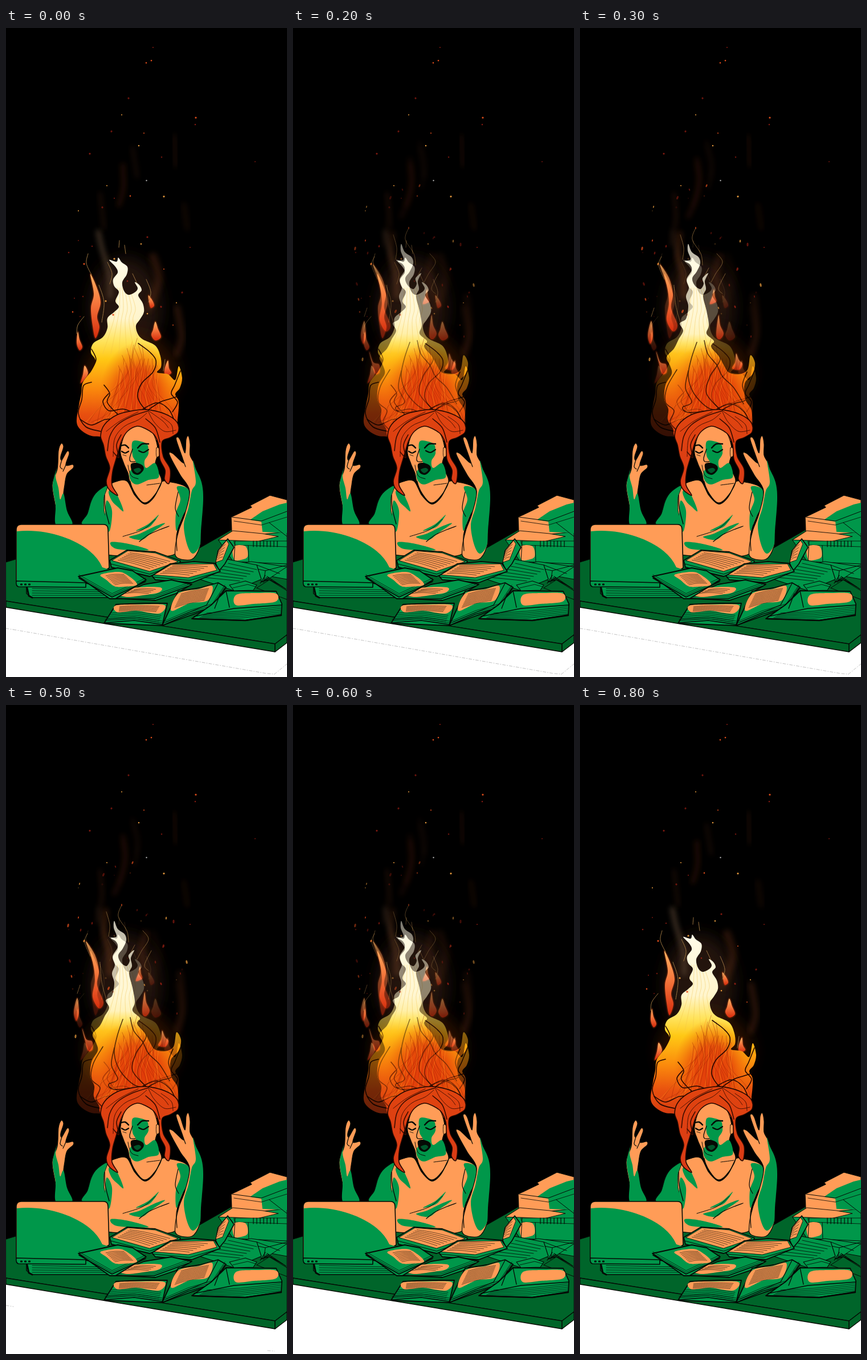
An HTML page for the animation above (0.9 s loop, 493 by 1136 pixels).

```html
<!DOCTYPE html>
<html lang="en">
<head>
<meta charset="utf-8">
<title>Burning the books</title>
<style>
html, body { margin: 0; width: 100%; height: 100%; overflow: hidden; background: #000; }
svg { display: block; width: 493px; height: 1136px; }
path { stroke-linejoin: round; stroke-linecap: round; }
</style>
</head>
<body>
<svg id="stage" viewBox="0 0 493 1136" xmlns="http://www.w3.org/2000/svg">
  <defs>
    <linearGradient id="fireA" gradientUnits="userSpaceOnUse" x1="0" y1="400" x2="0" y2="720">
      <stop offset="0" stop-color="#fffbe8"/><stop offset=".34" stop-color="#fff5cc"/>
      <stop offset=".46" stop-color="#ffe45e"/><stop offset=".56" stop-color="#ffc814"/>
      <stop offset=".72" stop-color="#fb8a0c"/><stop offset=".86" stop-color="#e8500f"/>
      <stop offset="1" stop-color="#d43a10"/>
    </linearGradient>
    <linearGradient id="fireB" gradientUnits="userSpaceOnUse" x1="0" y1="378" x2="0" y2="720">
      <stop offset="0" stop-color="#fffbe8"/><stop offset=".46" stop-color="#fff6d0"/>
      <stop offset=".51" stop-color="#ffe36a"/><stop offset=".56" stop-color="#ffc01a"/>
      <stop offset=".68" stop-color="#fa8c0e"/><stop offset=".8" stop-color="#e8540f"/>
      <stop offset="1" stop-color="#d43a10"/>
    </linearGradient>
    <radialGradient id="core">
      <stop offset="0" stop-color="#e03a0a"/><stop offset=".5" stop-color="#e4420a" stop-opacity=".85"/>
      <stop offset="1" stop-color="#f07008" stop-opacity="0"/>
    </radialGradient>
    <linearGradient id="lick" x1="0" y1="0" x2="0" y2="1">
      <stop offset="0" stop-color="#ffb060"/><stop offset=".45" stop-color="#f4763c"/>
      <stop offset="1" stop-color="#d62c0c"/>
    </linearGradient>
    <linearGradient id="hair" x1="0" y1="0" x2="0" y2="1">
      <stop offset="0" stop-color="#e0440f"/><stop offset="1" stop-color="#d93a16"/>
    </linearGradient>
    <filter id="soft" x="-1" y="-.5" width="3" height="2"><feGaussianBlur stdDeviation="5"/></filter>
    <filter id="haze" x="-1" y="-.5" width="3" height="2"><feGaussianBlur stdDeviation="14"/></filter>
  </defs>
</svg>
<script>
const GREEN = '#00974a', ORANGE = '#ff9c57', DARK = '#00652a', INK = '#050a05';
const stage = document.getElementById('stage');

function add(parent, name, attrs) {
  const el = document.createElementNS('http://www.w3.org/2000/svg', name);
  for (const key in attrs) el.setAttribute(key, attrs[key]);
  parent.appendChild(el);
  return el;
}
const group = (parent, attrs = {}) => add(parent, 'g', attrs);
const points = s => s.trim().split(/\s+/).map(p => p.split(',').map(Number));

// Smooth curve through the points
function curve(s, closed) {
  const p = points(s), n = p.length;
  const at = i => closed ? p[(i + n) % n] : p[Math.max(0, Math.min(n - 1, i))];
  let d = 'M' + p[0];
  for (let i = 0; i < n - (closed ? 0 : 1); i++) {
    const [a, b, c, e] = [at(i - 1), at(i), at(i + 1), at(i + 2)];
    const c1 = b.map((v, k) => v + (c[k] - a[k]) / 6);
    const c2 = c.map((v, k) => v - (e[k] - b[k]) / 6);
    d += `C${c1} ${c2} ${c}`;
  }
  return closed ? d + 'Z' : d;
}
const draw = (g, d, fill, stroke = 'none', width = 1) =>
  add(g, 'path', { d, fill, stroke, 'stroke-width': width });
const blob = (g, s, fill, stroke, width) => draw(g, curve(s, true), fill, stroke, width);
const poly = (g, s, fill, stroke, width) => draw(g, `M${s}Z`, fill, stroke, width);
const line = (g, s, width = 1.5, color = INK) => draw(g, curve(s), 'none', color, width);
const edge = (g, s, width = 1, color = INK) => draw(g, 'M' + s, 'none', color, width);

function sparks(g, s, long = 1) {
  const tones = ['#c8281a', '#e8501c', '#a82014', '#f0a040'];
  points(s).forEach(([x, y], i) => add(g, 'ellipse', {
    cx: x, cy: y, rx: 1 + i % 3 * .3, ry: (1 + i % 3 * .3) * long, fill: tones[i % 4],
    transform: `rotate(${i * 47 % 50 - 25} ${x} ${y})`, opacity: .65 + i % 2 * .3
  }));
}

function smoke(g, list) {
  list.forEach(([s, width, opacity, color = '#6a3214']) => {
    line(g, s, width, color);
    const el = g.lastChild;
    el.setAttribute('opacity', opacity);
    el.setAttribute('filter', 'url(#soft)');
  });
}

function flame(id, f) {
  const g = group(stage);
  add(g, 'rect', { y: 165, width: 493, height: 600, fill: '#000' });
  add(g, 'ellipse', { cx: 210, cy: 490, rx: 62, ry: 88, fill: '#3a2412', opacity: .6, filter: 'url(#haze)' });
  add(g, 'ellipse', { cx: 220, cy: 605, rx: 82, ry: 70, fill: '#4a1c04', opacity: .6, filter: 'url(#haze)' });
  smoke(g, f.smoke);
  f.licks.forEach(s => {
    blob(g, s, 'none', '#8a2a08', 4);
    g.lastChild.setAttribute('opacity', .35);
    blob(g, s, 'url(#lick)');
  });
  f.wisps.forEach(s => line(g, s, 1, '#9a7440'));
  const d = curve(f.body, true);
  draw(g, d, `url(#fire${id})`);
  draw(add(g, 'clipPath', { id: 'in' + id }), d, '#fff');
  const inner = group(g, { 'clip-path': `url(#in${id})` });
  add(inner, 'ellipse', { cx: 232, cy: 642, rx: f.core, ry: 92, fill: 'url(#core)' });
  for (let i = 0; i < 34; i++) {
    const x = 140 + i * 5, mid = 195 + i * 2.2, y = 540 + Math.abs(i - 15) * 3 + i % 4 * 9;
    const sway = 9 * Math.sin(i * 1.9);
    line(inner, `${mid},${y} ${mid + sway},${y + 35} ${(x + mid) / 2 - sway},${y + 75} ${x},690`,
      .8, i % 3 ? 'rgba(150,30,0,.5)' : 'rgba(255,150,30,.6)');
  }
  for (let i = 0; i < 6; i++)
    line(inner, `${196 + i * 4},455 ${192 + i * 7},490 ${188 + i * 7},515 ${170 + i * 14},570`, .8, 'rgba(240,190,70,.5)');
  f.strands.forEach(s => line(g, s, 1.6, '#250800'));
  sparks(g, f.sparks, f.streak);
  return g;
}

flame('B', {
  core: 84, streak: 2,
  body: `190,378 196,392 208,401 211,412 205,426 197,438 201,450 211,457 217,448 215,438 225,429 219,443
    221,457 216,470 222,495 226,520 222,535 235,548 230,558 244,575 252,590 261,603 279,606 294,598
    299,573 307,586 303,605 289,622 290,650 301,670 299,704 270,722 200,724 168,716 163,701 154,685
    155,667 148,650 150,625 161,605 158,591 152,576 165,561 173,545 181,530 175,517 186,509 190,487
    186,470 191,455 187,440 196,424 193,414 184,408 194,405 189,390`,
  licks: [
    '140,414 156,437 163,465 160,490 171,520 163,531 152,511 156,481 152,450',
    '125,513 128,538 123,553 119,537', '134,567 141,585 151,589 152,603 144,605 138,585',
    '235,458 237,470 239,479 228,483 232,470', '243,503 246,520 252,535 245,545 239,537',
    '274,570 279,581 285,588 280,598 267,596 272,585'
  ],
  wisps: ['203,350 197,370 212,395 215,415', '176,362 182,385 180,405', '143,400 138,415 148,440', '125,505 130,490',
    '240,395 250,410 238,430 230,445', '226,420 218,435', '255,430 243,455 250,465', '165,450 168,485 176,515'],
  smoke: [['175,360 172,400 180,430 182,470', 10, .55], ['205,230 210,265 203,300 190,330', 8, .4, '#5a2010'],
    ['245,400 238,430 246,470', 12, .4], ['165,290 168,330 160,380', 6, .3], ['295,190 298,240', 9, .18],
    ['305,470 310,530 300,570', 12, .3], ['222,200 232,240 225,280', 6, .22], ['312,310 318,350', 10, .15]],
  strands: [
    '218,547 224,570 240,590 250,610 270,630 287,658', '205,550 195,580 190,610 200,640 225,665 250,670',
    '170,598 153,628 150,655 165,670 158,690 172,706', '232,560 246,580 228,610 222,640 246,668',
    '293,602 285,625 291,650 272,657 250,668', '190,600 185,630 196,655 180,664 190,673 226,670',
    '240,667 265,658 288,672 300,695'
  ],
  sparks: `192,283 222,276 171,297 129,313 131,394 109,386 230,359 281,373 294,379 203,350 262,450 317,450
    306,470 115,475 112,448 243,490 272,488 180,496 246,368 137,413 276,422 127,372 151,382 122,580 300,540`
});

const flameA = flame('A', {
  core: 68, streak: 1,
  body: `197,402 203,410 213,418 212,431 204,445 207,460 215,467 227,462 231,455 226,445 234,450 238,459
    232,468 240,482 242,497 235,510 228,521 231,535 240,545 262,556 271,575 272,593 265,603 284,606 297,616
    303,592 309,612 305,630 297,641 303,655 301,685 296,708 250,724 190,724 170,716 150,714 133,705
    124,690 128,660 132,640 135,620 150,600 157,582 149,568 153,552 170,541 178,525 178,508 190,497
    198,488 192,478 198,462 190,452 188,440 196,428 192,418 181,406 194,409`,
  licks: [
    '148,431 159,453 166,480 160,505 164,524 157,543 152,522 149,490 154,465',
    '126,532 129,545 134,558 129,564 124,552', '138,591 144,604 137,616 131,621 135,606',
    '250,468 257,477 260,486 254,490 251,480', '262,514 267,527 272,541 262,547 255,538 258,528',
    '284,582 286,595 290,604 280,608 278,598'
  ],
  wisps: ['144,395 141,412 150,432', '199,372 198,384', '208,380 210,395', '222,430 230,447', '246,440 254,462 250,480',
    '137,505 126,520 124,535', '163,450 172,480 168,515', '178,410 186,430 182,448', '279,580 276,600'],
  smoke: [['162,357 168,385 181,430 183,470', 8, .7, '#5a4430'], ['205,240 206,280 198,310', 7, .4, '#5a2010'],
    ['258,400 268,440 250,490', 14, .35], ['165,290 172,350', 6, .25], ['295,190 298,240', 9, .18],
    ['300,490 308,540 300,570', 12, .35], ['222,210 230,260', 6, .22], ['312,310 318,350', 10, .15]],
  strands: [
    '232,552 252,567 263,582 258,602 238,622 231,645 240,663 250,670', '150,620 136,626 133,650 127,675 140,698 166,706',
    '180,640 170,654 181,670 205,667 228,675', '301,645 285,650 270,655 250,668',
    '306,600 296,625 290,640 301,655 292,672', '240,667 265,656 286,668 297,692',
    '172,625 182,640 178,656 200,680', '130,685 150,695 175,685 200,686', '150,562 158,580 150,598'
  ],
  sparks: `190,298 218,294 169,314 127,320 110,393 137,413 127,372 237,378 248,366 277,422 151,382 190,404
    120,473 117,497 309,463 299,481 213,443 188,502 130,505 248,500 272,488 293,520 135,470 175,478`
});

sparks(stage, `258,34 255,57 215,123 203,152 332,169 333,157 437,234 233,206 147,220 242,184 273,226 277,295
  323,384 246,61 185,181 177,276`);
add(stage, 'circle', { cx: 246.5, cy: 267, r: 1.2, fill: '#aaa' });

// Table
const desk = group(stage);
poly(desk, '0,1014 472,1092 493,1076 493,1136 0,1136', '#fff');
poly(desk, '0,935 20,929 180,917 340,910 398,877 493,870 493,1062 472,1078 0,1003', DARK, INK);
poly(desk, '0,1003 472,1078 472,1092 0,1014', '#006428', INK, 1.4);
poly(desk, '472,1078 493,1062 493,1076 472,1092', '#006428', INK, 1.4);

// Woman
const her = group(stage);
blob(her, `97,727 101,733 96,750 98,756 107,741 111,745 105,765 117,764 118,770 107,781 103,800 101,822
  108,848 116,870 110,880 88,872 87,840 81,800 90,772 92,740`, ORANGE, INK, 1.2);
blob(her, '90,768 87,785 92,805 95,825 101,815 107,845 116,869 88,870 87,835 82,800', GREEN);
line(her, '98,756 95,768 99,772', 1.2);
line(her, '105,765 100,776', 1.2);

blob(her, `212,793 190,795 165,809 151,825 143,850 134,870 150,915 230,925 298,920 301,880 312,850 321,815
  314,802 290,795 272,795 258,822 243,833 226,818`, ORANGE, INK, 1.2);
blob(her, '178,801 160,812 150,827 143,850 134,869 176,873 172,845 172,822', GREEN, INK, .8);
blob(her, '180,812 189,808 200,828 206,846 196,838 186,828', GREEN);
blob(her, '176,828 186,845 182,880 174,872', GREEN);
blob(her, '300,803 320,808 319,835 308,858 299,880 298,850 306,825', GREEN);
[['216,891 235,885 262,872 279,867 255,884 238,896', GREEN], ['228,880 250,868 268,852 252,873', GREEN],
 ['184,900 215,903 250,914 195,912', GREEN]].forEach(([s, c]) => blob(her, s, c));
line(her, '234,899 250,887 270,878 286,872', 1.3);
line(her, '205,890 240,878 262,860', 1);
line(her, '173,818 174,840 181,868', 1.4);
line(her, '302,812 297,840 303,855', 1.2);

blob(her, `286,744 293,745 309,760 311,757 299,722 301,716 306,722 314,744 316,720 320,714 323,728 323,748
  330,762 336,785 344,800 345,830 342,880 340,908 326,930 300,927 297,910 303,880 314,850 322,810 306,783 292,758`,
  ORANGE, INK, 1.2);
blob(her, '328,758 333,772 343,795 346,825 342,880 340,906 328,920 318,905 312,870 320,840 326,810 333,795', GREEN);
line(her, '311,757 315,768', 1.2);
line(her, '304,870 299,890 300,915', 1.2);

blob(her, `213,702 235,696 255,706 264,725 266,745 262,766 273,793 260,818 243,831 227,815 217,793
  214,779 206,760 201,738`, ORANGE, INK, 1);
blob(her, '222,724 238,724 249,731 250,746 243,758 246,770 262,762 268,786 250,791 230,799 219,792 217,777 228,762 222,748', GREEN);
blob(her, '250,726 262,728 264,745 258,760 248,765 244,757 250,745', ORANGE);
blob(her, '264,735 269,737 269,748 264,750', ORANGE, INK, .8);
line(her, '214,793 226,816 243,833 259,822 273,795', 1.6);
line(her, '218,793 220,802', 1);
line(her, '247,800 270,797', 1);
blob(her, '219,764 228,761 240,766 241,774 232,782 222,778', INK);
blob(her, '224,773 233,770 237,774 230,779', '#00552a');
line(her, '202,731 209,730 215,735', 2.4);
line(her, '231,735 239,728 250,728', 2.4);
line(her, '203,741 209,744 215,741', 2.2);
line(her, '233,740 241,743 250,738', 2.2);
line(her, '205,747 211,749', .8);
line(her, '222,737 217,753 219,759 227,759', 1.3);
line(her, '214,765 216,775 221,785 232,789', 1);

blob(her, `166,714 173,694 195,677 222,670 247,668 280,676 300,690 302,707 288,717 274,724 276,750 288,772
  286,797 278,790 279,774 270,755 268,730 260,712 246,702 230,697 213,706 203,722 198,738 193,755 187,777
  186,800 196,818 181,808 176,793 182,770 175,750 171,730`, 'url(#hair)', '#250800', 1.6);
[`250,670 220,680 195,695 182,715 178,740`, `247,674 232,686 208,697 191,718 188,750`, `250,672 260,690 278,706 298,704`,
 `245,684 262,700 270,725`, `272,680 290,694 293,710`, `232,672 200,688 176,706`, `188,742 198,752 194,730 202,712`,
 `250,670 275,688 285,700`].forEach((s, i) => line(her, s, i % 3 ? .9 : 1.6, '#3a0c00'));

// Boxes on the right
const room = group(stage);
poly(room, '373,896 398,880 493,866 493,965 410,950', GREEN, INK);
poly(room, '395,856 404,852 431,839 428,836 463,818 493,826 493,882 450,886 396,882', ORANGE, INK, 1.2);
poly(room, '428,861 450,846 480,834 493,831 493,884 450,882 448,864', GREEN);
edge(room, '396,856 448,863 493,846');
edge(room, '400,863 448,870 493,856', .8);
poly(room, '373,896 398,880 450,885 478,890 440,899 402,897', ORANGE, INK, .9);
poly(room, '400,898 493,898 493,908 402,905', GREEN, INK, .8);
for (let x = 434; x < 478; x += 6) edge(room, `${x},898 ${x},908`, 1.2);
blob(room, '399,908 420,907 424,925 412,931 400,930', ORANGE);
edge(room, '400,934 493,938 M425,906 426,935 M402,898 400,934 M462,866 493,890');
poly(room, '404,939 430,934 493,943 452,970', GREEN, INK);
edge(room, '404,939 455,950 493,940 M455,950 452,970 M410,955 440,940 480,955');
for (let i = 0; i < 7; i++) edge(room, `${446 + i * 2},${972 - i * 2} ${455 + i * 6},${958 + i * 4}`, 1.2);
poly(room, '440,980 462,966 493,985 493,1000', DARK, INK);

// Laptop
const laptop = group(stage);
poly(laptop, '36,978 140,972 205,985 190,997 46,997 36,990', GREEN, INK, 1.5);
for (let i = 0; i < 4; i++) edge(laptop, `46,${981 + i * 4} 180,${984 + i * 3}`, .8);
edge(laptop, '37,980 40,994 46,997', 3);
draw(laptop, 'M18,881Q17,869 27,869H171Q179,869 179,878L181,945 138,972 18,968Z', ORANGE, INK, 1.6);
draw(laptop, 'M19,881C70,876 118,893 146,915Q162,928 169,944L181,948 138,972 19,968Z', GREEN);
draw(laptop, 'M18,968L140,971V979L22,978Q17,977 18,968Z', GREEN, INK, 1.6);
for (const x of [25, 32, 39]) add(laptop, 'rect', { x, y: 972.5, width: 4, height: 3, rx: 1, fill: INK });

// Open books: cover, thick lower edge, printed page
const books = group(stage);
function print(quad, rows) {
  const [a, b, c, d] = points(quad);
  const mix = (p, q, t) => p.map((v, k) => v + (q[k] - v) * t);
  for (let i = 1; i < rows; i++) {
    const t = i / rows, l = mix(a, d, t), r = mix(b, c, t), m = mix(l, r, .45);
    line(books, `${mix(l, r, .08)} ${m[0]},${m[1] - 1.5} ${mix(l, r, .92)}`, .6);
  }
}
function book(cover, low, page, rows, quad) {
  poly(books, cover, GREEN, INK, 1.8);
  for (let i = 0; i < 3; i++) {
    edge(books, low, i ? .7 : 1.6);
    books.lastChild.setAttribute('transform', `translate(0 ${-i * 3})`);
  }
  blob(books, page, ORANGE);
  print(quad || page, rows);
}
poly(books, '340,965 378,928 440,940 448,965 400,985', GREEN, INK, 1.2);
for (let i = 0; i < 6; i++) edge(books, `${350 + i * 8},${962 - i * 5} ${410 + i * 6},${968 - i * 4}`, .8);
poly(books, '368,937 372,915 389,894 400,909 384,938 374,950', GREEN, INK, 1.6);
poly(books, '368,935 373,914 387,897 391,903 380,931', ORANGE, INK, .8);
print('373,914 387,897 380,931 369,935', 6);

poly(books, '182,932 212,914 262,917 306,933 303,941 252,960 185,944', GREEN, INK, 1.8);
poly(books, '186,932 214,915 262,919 302,934 252,951', ORANGE, INK, .8);
print('214,915 300,933 252,950 188,932', 8);
edge(books, '184,938 252,956 303,938', 1);

poly(books, '256,959 288,938 330,934 366,937 376,951 326,971 262,966', GREEN, INK, 1.8);
poly(books, '260,957 290,939 364,938 370,949 320,962', ORANGE, INK, .8);
print('290,939 366,940 320,961 262,957', 7);
edge(books, '258,961 322,967 374,952', 1);

book('186,998 242,974 290,966 326,974 298,990 262,1002', '190,999 260,999 320,977',
  '198,990 225,980 270,979 268,988 240,993 212,996', 5, '226,981 270,980 250,992 200,992');
book('127,960 196,945 222,950 246,966 192,999 182,999', '128,963 186,996 245,969',
  '166,957 195,952 212,957 230,974 205,978 190,977 176,966', 9, '170,957 208,954 228,974 190,977');
book('172,1042 193,1009 240,1007 283,1007 274,1046', '174,1041 225,1037 274,1044',
  '192,1011 235,1009 278,1010 268,1025 228,1020 196,1023', 6, '193,1011 277,1010 268,1024 192,1022');
for (let i = 0; i < 5; i++)
  line(books, `${185 - i * 2},${1024 + i * 3} 225,${1022 + i * 3} ${272 - i},${1028 + i * 3}`, .7);
book('274,1046 302,986 340,980 372,971 386,979 364,1014 318,1030', '276,1045 320,1026 362,1014 384,981',
  '302,990 338,982 362,977 354,1002 322,1007 290,1020', 11, '304,989 361,978 352,1003 290,1018');
edge(books, '372,972 352,1010 280,1040', 1.2);

poly(books, '326,1034 360,1010 386,985 474,986 484,1008 483,1027 420,1037', GREEN, INK, 1.8);
blob(books, '404,992 440,989 474,990 473,1004 435,1008 403,1010', ORANGE);
edge(books, '330,1030 400,1016 484,1010 M376,990 366,1016 M386,985 392,1014', 1.3);
for (let i = 0; i < 5; i++) edge(books, `${340 + i * 3},${1032 - i * 2} 410,${1033 - i * 3} 482,${1025 - i * 3}`, .7);
edge(books, '328,1034 420,1037 483,1028', 2.4);
poly(books, '392,975 420,968 440,975 434,984 400,985', GREEN, INK, 1.2);
edge(books, '398,980 424,974 438,978', .8);

// Faint trace below the table
const dashes = d => add(stage, 'path', {
  d, fill: 'none', stroke: '#b4b4b4', 'stroke-width': .8, 'stroke-dasharray': '5 3 1 3'
});
const trace = dashes('M13,1053L458,1130M471,1131L493,1113');
const ends = dashes('M0,1051L13,1053M459,1130L471,1131');

// Nine held steps of 100 ms
function hold(el, values) {
  const last = values[values.length - 1];
  const keys = values.map((opacity, i) => ({ opacity, offset: i / values.length, easing: 'steps(1, end)' }));
  el.animate([...keys, { opacity: last, offset: 1 }], { duration: 900, iterations: Infinity });
}
const steps = [...Array(9).keys()];
hold(flameA, steps.map(i => Math.abs(i - 4) / 4));
hold(trace, steps.map(i => +(i < 5)));
hold(ends, steps.map(i => +(i < 6)));
</script>
</body>
</html>
```
